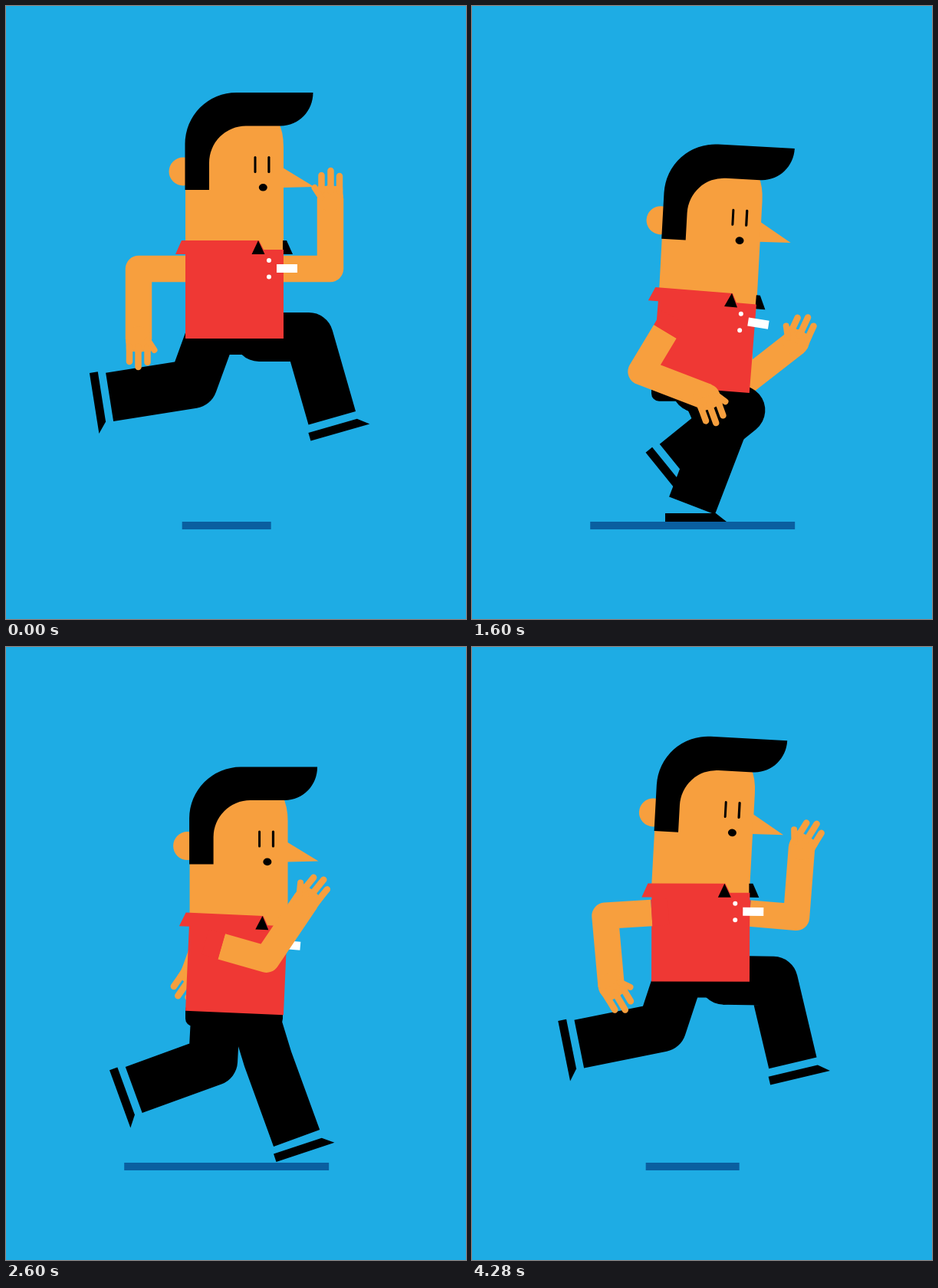
Recreate the animation shown at these times as an HTML page with a canvas. Size 600x800 px, loop 4.32 s.

```html
<!DOCTYPE html>
<html lang="en">
<head>
<meta charset="utf-8">
<title>Runner</title>
<style>
  html, body { margin: 0; width: 100%; height: 100%; overflow: hidden; background: #1eace4; }
  canvas { display: block; }
</style>
</head>
<body>
<canvas id="stage" width="600" height="800"></canvas>
<script>
const ctx = document.getElementById('stage').getContext('2d');
const SKY = '#1eace4', SKIN = '#f79f3e', RED = '#ef3834', BLACK = '#000', SHADE = '#0a5fa0';
const STEP = 40, CYCLE = 18, HALF = 9;
const THIGH = 65, SHIN = 110, SLEEVE = 22, UPPER = 83, FORE = 92;
const FLOOR = 652; // lowest ankle

// Each half stride runs leap -> landing -> squat, then springs to the next leap.
const POSES = [0, 2, 4, HALF];
const EASE = [k => k * k, k => k * (2 - k), k => k * (2 - k)];

// Joint angles at those poses over a full stride: 0 is down, positive is forward.
const JOINT = {
  thigh: [90, 17, 24, -20, -3, 63],
  shin: [16, 20, -21, -81, -70, -51],
  upper: [-90, -126, -31, 90, 74, 2],
  fore: [0, -20, 69, 180, 146, 128],
  hand: [0, -35, 20, 180, 141, 155]
};

const rad = d => d * Math.PI / 180;
const clamp = v => Math.min(1, Math.max(0, v));

function mix(values, step, loose = false) {
  const t = step % HALF;
  const n = t < POSES[1] ? 0 : t < POSES[2] ? 1 : 2;
  const i = Math.floor(step / HALF) * 3 + n;
  const a = values[i % values.length], b = values[(i + 1) % values.length];
  const k = (t - POSES[n]) / (POSES[n + 1] - POSES[n]);
  return a + (b - a) * (loose ? k : EASE[n](k));
}

const reach = ([x, y], angle, length) =>
  [x + Math.sin(rad(angle)) * length, y + Math.cos(rad(angle)) * length];

function poly(color, ...xy) {
  ctx.fillStyle = color;
  ctx.beginPath();
  for (let i = 0; i < xy.length; i += 2) ctx.lineTo(xy[i], xy[i + 1]);
  ctx.fill();
}

function line(color, width, points, cap = 'butt') {
  ctx.strokeStyle = color;
  ctx.lineWidth = width;
  ctx.lineCap = cap;
  ctx.lineJoin = 'round';
  ctx.beginPath();
  points.forEach(p => ctx.lineTo(...p));
  ctx.stroke();
}

function oval(color, x, y, rx, ry = rx) {
  ctx.fillStyle = color;
  ctx.beginPath();
  ctx.ellipse(x, y, rx, ry, 0, 0, Math.PI * 2);
  ctx.fill();
}

function box(color, x, y, w, h, r = 0) {
  ctx.fillStyle = color;
  ctx.beginPath();
  ctx.roundRect(x, y, w, h, r);
  ctx.fill();
}

function placed([x, y], angle, draw) {
  ctx.save();
  ctx.translate(x, y);
  ctx.rotate(rad(angle));
  draw();
  ctx.restore();
}

function drawLeg(step, drop) {
  const thigh = mix(JOINT.thigh, step), shin = mix(JOINT.shin, step);
  const hip = [298 + 32 * Math.cos(step / CYCLE * Math.PI * 2), 432 + drop];
  // The thigh gives way so that the ankle never sinks through the floor.
  const room = (FLOOR - SHIN * Math.cos(rad(shin)) - hip[1]) / Math.cos(rad(thigh));
  const knee = reach(hip, thigh, Math.min(THIGH, room));
  const ankle = reach(knee, shin, SHIN);
  const planted = clamp((ankle[1] - FLOOR) / 12 + 1);
  oval(BLACK, ...hip, 32);
  line(BLACK, 64, [hip, knee, ankle]);
  placed(ankle, shin * (planted - 1), () => poly(BLACK, -35, 10, 31, 10, 45, 21, -35, 21));
}

function drawHand() {
  poly(SKIN, -17, -1, 17, -1, 16, 16, -16, 16);
  for (const [x, tip] of [[-12, 29], [-0.5, 36], [11.5, 30]]) {
    line(SKIN, 8.5, [[x, 10], [x, tip]], 'round');
  }
  line(SKIN, 8, [[12, 1], [20.5, 14]], 'round');
}

function drawArm(step, shoulder) {
  const upper = mix(JOINT.upper, step);
  const cuff = reach(shoulder, upper, SLEEVE);
  const elbow = reach(shoulder, upper, UPPER);
  const wrist = reach(elbow, mix(JOINT.fore, step), FORE);
  line(SKIN, 34.5, [cuff, elbow, wrist]);
  oval(SKIN, ...wrist, 17);
  line(RED, 34.5, [shoulder, cuff]);
  placed(wrist, -mix(JOINT.hand, step, true), drawHand);
}

// Origin: middle of the collar
function drawHead() {
  oval(SKIN, -67, -90, 18.5);
  ctx.fillStyle = SKIN;
  ctx.beginPath();
  ctx.moveTo(-64, 20);
  ctx.lineTo(-64, -100);
  ctx.lineTo(-30, -155);
  ctx.lineTo(57, -155);
  ctx.quadraticCurveTo(64, -142, 64, -122);
  ctx.lineTo(64, 20);
  ctx.fill();
  poly(SKIN, 63, -95, 104, -70, 63, -69);

  ctx.fillStyle = BLACK;
  ctx.beginPath();
  ctx.moveTo(-64.5, -66);
  ctx.lineTo(-64.5, -126);
  ctx.arcTo(-64.5, -193, 2.5, -193, 67);
  ctx.lineTo(102.5, -193);
  ctx.bezierCurveTo(102.5, -169, 84, -149.5, 60, -149.5);
  ctx.lineTo(15, -149.5);
  ctx.arcTo(-33, -149.5, -33, -101.5, 48);
  ctx.lineTo(-33, -66);
  ctx.fill();

  box(BLACK, 25.5, -110, 3, 22, 1.5);
  box(BLACK, 43.3, -110, 3.2, 22, 1.5);
  oval(BLACK, 37.3, -69.2, 5.5, 4.8);
}

// Origin: middle of the hem
function drawShirt(tilt) {
  poly(BLACK, 63, -128, 68, -128, 76, -110, 63, -110);
  poly(RED, -69, -128, 32, -128, 38, -116, 64, -116, 64, 0, -64, 0, -64, -110, -77, -110);
  poly(BLACK, 31, -128, 39.5, -110, 22.5, -110);
  oval('#fff', 45, -102, 3);
  oval('#fff', 45, -80.5, 3);
  placed([68.5, -91.5], tilt, () => box('#fff', -13.5, -5.5, 27, 11));
}

function drawScene(step) {
  const drop = mix([0, 43.5, 66], step);
  const tilt = mix([0, 2.5, 4.5], step);
  const shadow = mix([116, 267, 267], step);
  // The head bows late, while the body is already rising.
  const nod = 4.4 * Math.max(0, Math.sin((step % HALF - 2) / 8 * Math.PI));
  const hem = [298, 434 + drop];
  const onShirt = (x, y) => {
    const c = Math.cos(rad(tilt)), s = Math.sin(rad(tilt));
    return [hem[0] + x * c - y * s, hem[1] + x * s + y * c];
  };
  const [neckX, neckY] = onShirt(0, -128);

  box(SKY, 0, 0, 600, 800);
  box(SHADE, 287.7 - shadow / 2, 673, shadow, 10);
  drawArm(step + HALF, onShirt(42, -91));
  drawLeg(step + HALF, drop);
  drawLeg(step, drop);
  box(BLACK, 234, 424 + drop * 0.92, 127, 31, 10);
  placed([neckX, neckY + nod * 0.25], nod, drawHead);
  placed(hem, tilt, () => drawShirt(tilt));
  drawArm(step, onShirt(-42, -91));
}

const start = performance.now();
function tick() {
  const time = performance.now() - start;
  drawScene(Math.floor(time / STEP) % CYCLE);
  requestAnimationFrame(tick);
}
tick();
</script>
</body>
</html>
```
